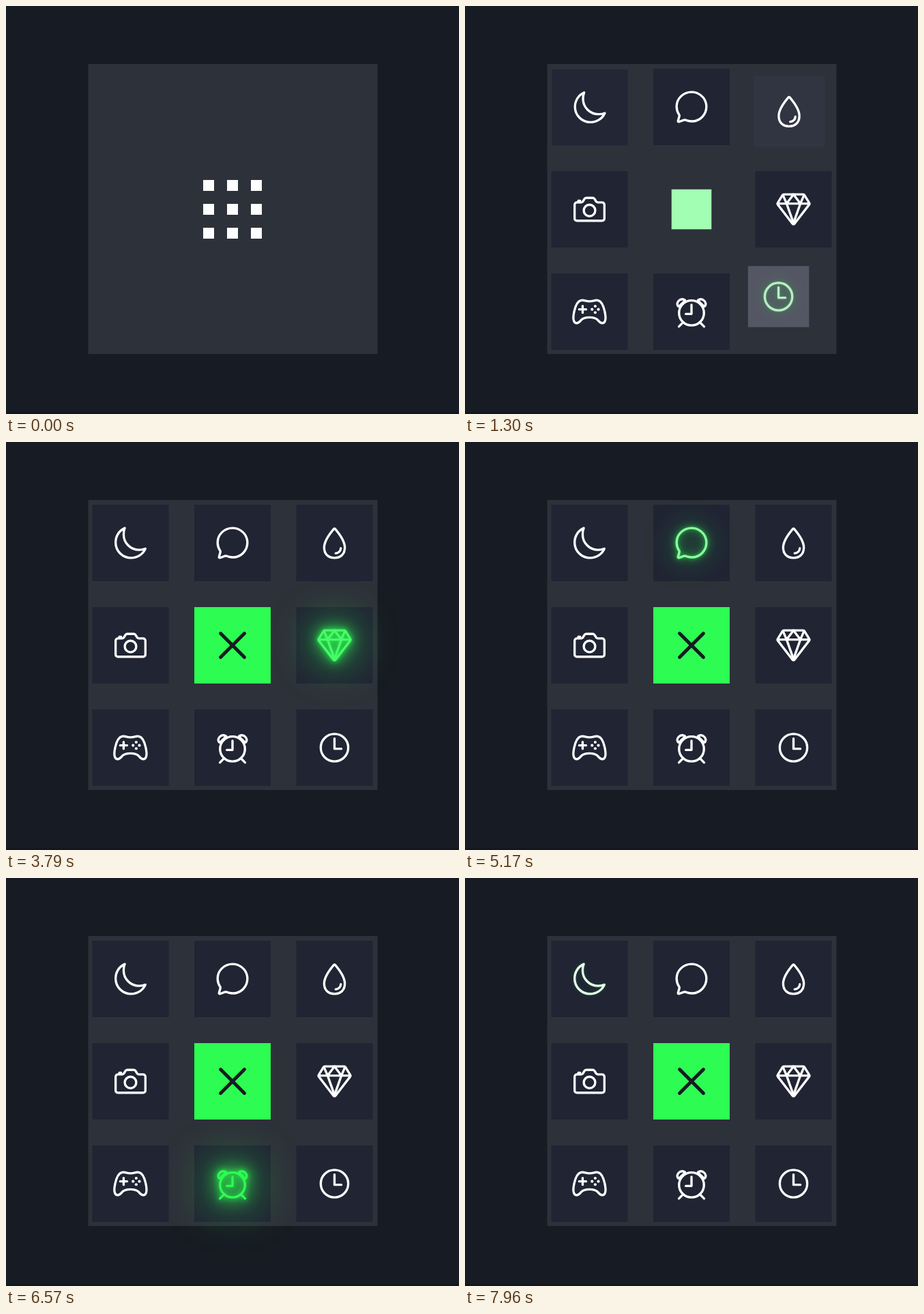
Recreate the animation shown at these times as an HTML page. Size 664 px wide and 598 px high, loop 8 s.

```html
<!DOCTYPE html>
<html lang="en">
<head>
<meta charset="utf-8">
<title>Grid menu</title>
<style>
  html, body { margin: 0; width: 100%; height: 100%; overflow: hidden; background: #171b23; }
  svg { display: block; width: 664px; height: 598px; }
  .icon { fill: none; stroke-width: 32; stroke-linecap: round; stroke-linejoin: round; }
</style>
</head>
<body>
<svg id="stage" viewBox="0 0 664 598">
  <rect width="664" height="598" fill="#171b23"/>
  <rect y="595" width="664" height="3" fill="#131720"/>
  <rect x="120.5" y="85" width="424" height="425" fill="#2d3139"/>
</svg>
<script>
const LOOP = 8000, DURATION = 500, STAGGER = 100;
const CENTER = { x: 332, y: 298 };
const WHITE = [255, 255, 255], GREEN = [45, 252, 82], NAVY = [32, 36, 51], DARK = [22, 27, 35];

const line = d => `<path d="${d}"/>`;
const ring = (x, y, r) => `<circle cx="${x}" cy="${y}" r="${r}"/>`;
const dot = (x, y) => `<circle cx="${x}" cy="${y}" r="20" fill="currentColor" stroke="none"/>`;
const mirror = s => s + `<g transform="translate(512 0) scale(-1 1)">${s}</g>`;

// Icons on a 512 unit square
const icons = {
  camera: line('M350.5 148.7l-26.6-42.1C318.3 100 310.6 96 302 96h-92c-8.6 0-16.3 4-21.9 10.6l-26.6 42.1C155.9 155.2 148.6 160 140 160H80a32 32 0 0 0-32 32v192a32 32 0 0 0 32 32h352a32 32 0 0 0 32-32V192a32 32 0 0 0-32-32h-59c-8.6 0-16.9-4.8-22.5-11.3zM124 158v-22h-24v22') + ring(256, 272, 80),
  diamond: line('M35.4 188.2l207.8 269.5a16 16 0 0 0 25.6 0l207.8-269.5a16.5 16.5 0 0 0 .9-18.7L407 55.7A16 16 0 0 0 393.3 48H118.7a16 16 0 0 0-13.8 7.7L34.5 169.5a16.5 16.5 0 0 0 .9 18.7zM48 176h416') +
    mirror(line('M112 64l48 112 96-128M256 448l-96-272')),
  chat: line('M87.5 380c1.2-4.4-1.4-10.5-4-14.9a45 45 0 0 0-2.5-3.8a200 200 0 0 1-33-110C47.7 139 140.7 48 255.8 48C356 48 440 117.5 459.6 209.9a199 199 0 0 1 4.4 41.6c0 112.4-89.5 204.9-204.6 204.9-18.3 0-43-4.6-56.5-8.4s-26.9-8.8-30.4-10.1a31 31 0 0 0-23.2.4l-67.8 24.5a16 16 0 0 1-4.7 1.2a9.6 9.6 0 0 1-9-13z'),
  alarm: ring(256, 274, 174) + line('M256 160v128h-80') +
    mirror(line('M66 176C40 128 92 60 160 92C176 100 160 108 152 114L84 180C78 186 70 184 66 176zM128 416l-48 48')),
  gamepad: line('M467.5 248.8c-18.4-83.2-45.7-136.2-89.4-149.1A91.5 91.5 0 0 0 352 96c-26.9 0-48.1 16-96 16s-69.1-16-96-16a99 99 0 0 0-27.2 3.7C89 112.6 61.9 165.7 43.3 248.8c-19 84.9-15.6 152 21.6 164.9 26 9 49.2-9.6 71.3-37 25-31.2 55.8-40.8 119.8-40.8s93.6 9.6 118.7 40.8c22 27.4 46.1 45.8 71.4 37.2 41-14 40.4-79.1 21.4-165.1zM160 176v96M208 224h-96') +
    dot(292, 224) + dot(336, 180) + dot(336, 268) + dot(380, 224),
  moon: line('M160 136c0-30.6 4.5-61.6 16-88C99.6 81.3 48 159.3 48 248c0 119.3 96.7 216 216 216 88.7 0 166.7-51.6 200-128-26.4 11.5-57.4 16-88 16-119.3 0-216-96.7-216-216z'),
  water: line('M400 320c0 88.4-55.6 144-144 144s-144-55.6-144-144c0-94.8 103.2-222.9 134.9-259.9a12 12 0 0 1 18.2 0C296.8 97.2 400 225.2 400 320zM344 328a72 72 0 0 1-72 72'),
  clock: ring(256, 256, 192) + line('M256 128v144h96'),
  close: line('M368 368L144 144M368 144L144 368')
};

// Name, column and row, in the order the tiles open
const layout = [
  ['camera', -1, 0], ['diamond', 1, 0], ['chat', 0, -1], ['alarm', 0, 1], ['gamepad', -1, 1],
  ['moon', -1, -1], ['water', 1, -1], ['clock', 1, 1], ['close', 0, 0]
];

// Pointer visits: name, enter, leave
const hovers = [
  ['clock', 1210, 1390], ['diamond', 3500, 3980], ['chat', 5010, 5190],
  ['alarm', 5940, 6650], ['clock', 6770, 6950], ['moon', 7905, 8400]
];

const clamp = v => Math.min(1, Math.max(0, v));
const lerp = (a, b, p) => a + (b - a) * p;
const mix = (a, b, p) => `rgb(${a.map((v, i) => Math.round(lerp(v, b[i], p)))})`;

// cubic-bezier(.25, .1, .25, 1)
function ease(x) {
  if (x <= 0) return 0;
  if (x >= 1) return 1;
  const curve = (a, b, u) => 3 * a * u * (1 - u) ** 2 + 3 * b * u * u * (1 - u) + u ** 3;
  let lo = 0, hi = 1;
  for (let i = 0; i < 24; i++) {
    const mid = (lo + hi) / 2;
    if (curve(.25, .25, mid) < x) lo = mid; else hi = mid;
  }
  return curve(.1, 1, lo);
}

// Opening clock, with a short stall on the way
const openTime = t => t < 880 ? t - 300 : t < 1090 ? 580 : t - 368;

function glow(name, t) {
  let best = 0;
  for (const [who, enter, leave] of hovers) {
    if (who !== name || t < enter) continue;
    const up = ease((Math.min(t, leave) - enter) / DURATION);
    best = Math.max(best, t < leave ? up : up * (1 - ease((t - leave) / DURATION)));
  }
  return best;
}

function shadow(p) {
  if (p < .01) return 'none';
  return [4.5, 11, 34]
    .map(r => `drop-shadow(0 0 ${(r * p).toFixed(2)}px rgba(${GREEN},${p.toFixed(3)}))`).join(' ');
}

const stage = document.getElementById('stage');
const add = (tag, parent) =>
  parent.appendChild(document.createElementNS('http://www.w3.org/2000/svg', tag));

const tiles = layout.map(([name, col, row], i) => {
  const group = add('g', stage), box = add('rect', group), halo = add('g', group);
  const icon = add('g', halo);
  const scale = name === 'close' ? .156 : .105;
  icon.setAttribute('class', 'icon');
  icon.setAttribute('transform', `scale(${scale}) translate(-256 -256)`);
  icon.setAttribute('stroke', 'currentColor');
  icon.innerHTML = icons[name];
  return { name, col, row, start: i * STAGGER, group, box, halo };
});

function render(t) {
  const now = openTime(t);
  for (const tile of tiles) {
    const grow = ease((now - tile.start) / DURATION);
    const move = ease((now + 20 - tile.start) / DURATION);
    const size = lerp(16, 112, grow), far = lerp(35, 149.5, move);
    const isClose = tile.name === 'close', lit = glow(tile.name, t);
    tile.group.setAttribute('transform',
      `translate(${CENTER.x + tile.col * far} ${CENTER.y + tile.row * lerp(35, 150, move)})`);
    for (const k of ['x', 'y']) tile.box.setAttribute(k, -size / 2);
    for (const k of ['width', 'height']) tile.box.setAttribute(k, size);
    tile.box.setAttribute('fill', mix(WHITE, isClose ? GREEN : NAVY, grow));
    tile.halo.style.opacity = clamp((grow - .5) / .3);
    tile.halo.style.color = isClose ? mix(DARK, DARK, 0) : mix(WHITE, GREEN, lit);
    tile.halo.style.filter = shadow(lit);
  }
}

const begin = performance.now();
function tick() {
  render((performance.now() - begin) % LOOP);
  requestAnimationFrame(tick);
}
tick();
</script>
</body>
</html>
```
